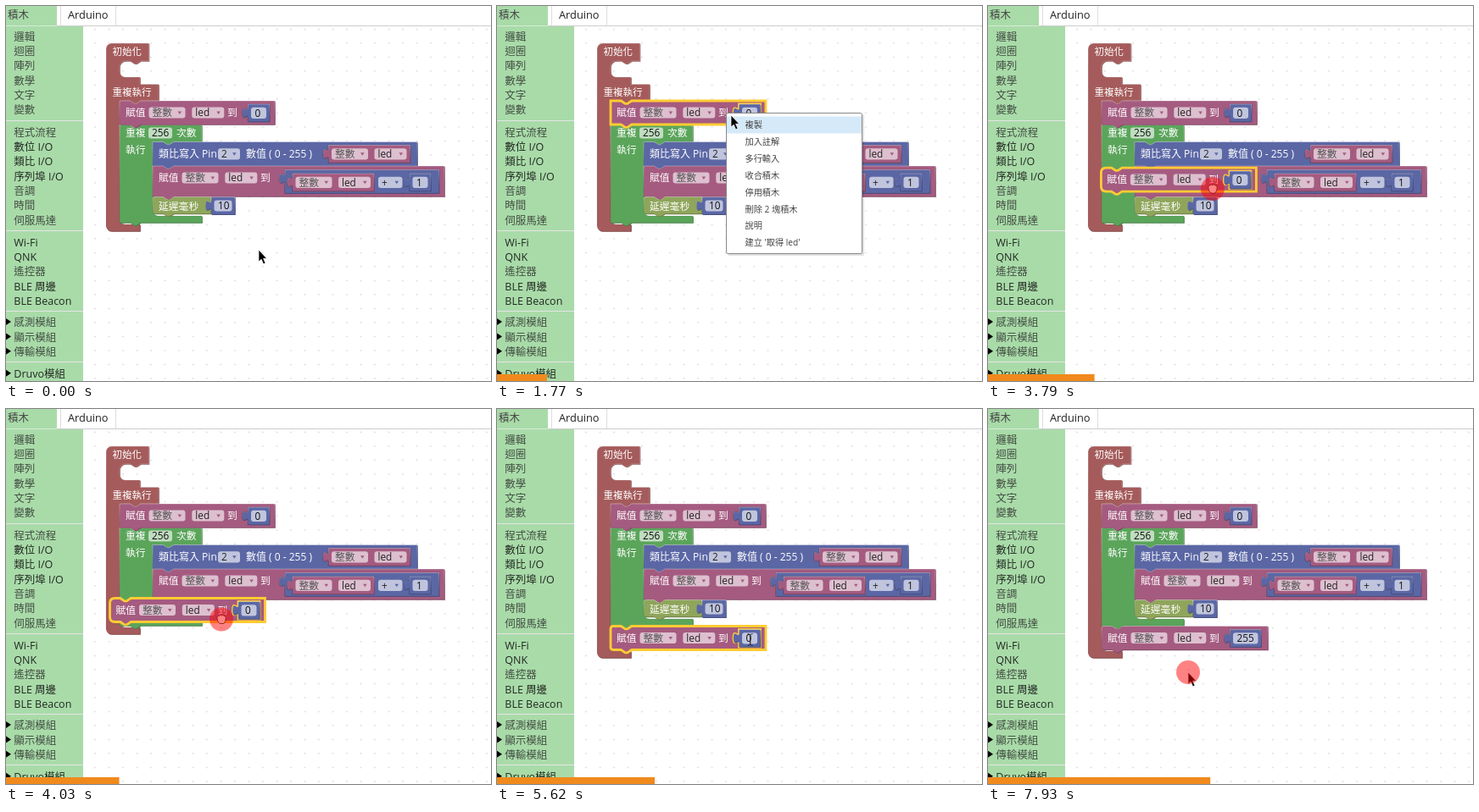
Recreate the animation shown at these times as an HTML page. Size 572 by 443 pixels, loop 8000 ms.

```html
<!DOCTYPE html>
<html lang="zh-Hant">
<head>
<meta charset="utf-8">
<title>Block editor</title>
<style>
html, body { margin: 0; width: 100%; height: 100%; overflow: hidden; background: #fff; }
svg { display: block; }
text { font-family: 'Open Sans', 'Noto Sans CJK TC', 'Noto Sans CJK', 'Noto Sans CJK JP', sans-serif; white-space: pre; }
</style>
</head>
<body>
<svg id="stage" width="572" height="443" viewBox="0 0 572 443"></svg>
<script>
const BROWN = '#a55b5b', PINK = '#a55b80', GREEN = '#5ba55b', BLUE = '#5b67a5', OLIVE = '#8fa55b';
const LOOP = 8000;

// ---- drawing helpers ----
const shade = c => c.replace(/\w\w/g, h => Math.round(parseInt(h, 16) * .8).toString(16).padStart(2, '0'));
const text = (x, y, s, fill = '#fff', size = 11.8) =>
  `<text x="${x}" y="${y}" fill="${fill}" font-size="${size}">${s}</text>`;
const rect = (x, y, w, h, fill, more = '') =>
  `<rect x="${x}" y="${y}" width="${w}" height="${h}" fill="${fill}" ${more}/>`;
const line = (x1, y1, x2, y2, c) => `<path d="M${x1} ${y1}L${x2} ${y2}" stroke="${c}" fill="none"/>`;
const glow = d => `<path d="${d}" fill="none" stroke="#fc3" stroke-width="2.8"/>`;
const block = (col, d) =>
  `<path d="${d}" transform="translate(.8 .8)" fill="${shade(col)}"/>` +
  `<path d="${d}" fill="${col}" stroke="url(#edge)" stroke-width=".8"/>`;

const NOTCH = 'l5 3.3h2.5l5 -3.3', NOTCH_BACK = 'l-5 3.3h-2.5l-5 -3.3';

function stackPath(x, y, w, h, r = 0) {
  return `M${x} ${y + r}q0 ${-r} ${r} ${-r}H${x + 12.3}${NOTCH}H${x + w}v${h}` +
    `H${x + 24.8}${NOTCH_BACK}H${x + r}q${-r} 0 ${-r} ${-r}z`;
}
function mouth(x, top, bottom, right) {
  return `V${top}H${x + 24.8}${NOTCH_BACK}H${x + 6.5}a6.5 6.5 0 0 0 -6.5 6.5V${bottom - 6.5}` +
    `a6.5 6.5 0 0 0 6.5 6.5H${right}`;
}
function valuePath(x, y, w, h = 20.5) {
  return `M${x} ${y}v4c0 8.2 -6.5 -6.5 -6.5 6.1s6.5 -2 6.5 6.1V${y + h}h${w}V${y}z`;
}
function socket(col, x, y, w, h) {
  return `<path d="${valuePath(x, y, w, h)}" fill="none" stroke="${shade(col)}" stroke-width="1.6"/>`;
}
function field(x, cy, w) {
  return rect(x, cy - 6.6, w, 13.2, '#fff', 'rx="3" fill-opacity=".62"');
}
function drop(x, cy, w, s, col, ink = '#222') {
  const a = x + w - 9;
  return field(x, cy, w) + text(x + 4, cy + 4.2, s, ink) +
    `<path d="M${a} ${cy - 1.5}h4.6l-2.3 3.4z" fill="${col}"/>`;
}
const typeDrop = (x, cy) => drop(x, cy, 43, '整數', PINK, '#555');
const nameDrop = (x, cy) => drop(x, cy, 38, 'led', PINK);

function num(x, y, w, s) {
  return block(BLUE, valuePath(x, y, w)) + field(x + 3.5, y + 10.3, w - 7) + text(x + 8, y + 14.6, s, '#111');
}
function getter(x, y) {
  return block(PINK, valuePath(x, y, 96)) + typeDrop(x + 3.5, y + 10.3) + nameDrop(x + 54, y + 10.3);
}
function setHead(x, cy) {
  return text(x + 7, cy + 4, '賦值') + typeDrop(x + 34.5, cy) + nameDrop(x + 85.3, cy) + text(x + 127, cy + 4, '到');
}

// "set led" block at its own origin
function setBlock({ r = 0, sel, val = '0', edit }) {
  const grow = val.length > 2 ? 13 : 0, nw = 25 + (grow ? 11.5 : 0);
  const d = stackPath(0, 0, 183 + grow, 28, r), n = valuePath(151.5, 4, nw);
  let s = block(PINK, d) + (sel ? glow(d) + glow(n) : socket(PINK, 151.5, 4, nw)) +
    setHead(0, 14) + num(151.5, 4, nw, val);
  if (edit) {
    s += glow(n) + rect(153.8, 6.5, nw - 5.2, 16, '#fff', 'stroke="#556" stroke-width=".8"');
    if (edit.all) s += rect(156, 8, 7, 13, '#3390ff');
    s += text(156, 19, edit.text, edit.all ? '#fff' : '#111');
  }
  return s;
}

// ---- fixed parts ----
function toolbox() {
  let s = rect(0, 0, 60, 24, '#a9dba9') + rect(0, 24, 91, 419, '#a9dba9') +
    line(0, 23.5, 60, 23.5, '#d4ecd4') + line(60, 23.5, 572, 23.5, '#ccc') +
    line(64.5, 0, 64.5, 23, '#ddd') + line(129.5, 0, 129.5, 23, '#ddd') +
    text(2, 15, '積木', '#444', 12.5) + text(73, 15, 'Arduino', '#222', 12.8);
  const groups = [
    [36, '邏輯 迴圈 陣列 數學 文字 變數'],
    [149, '程式流程 數位_I/O 類比_I/O 序列埠_I/O 音調 時間 伺服馬達'],
    [279, 'Wi-Fi QNK 遙控器 BLE_周邊 BLE_Beacon'],
    [373.6, '感測模組 顯示模組 傳輸模組', 1],
    [434.3, 'Druvo模組', 1]
  ];
  for (const [y0, names, arrow] of groups) {
    const sep = Math.round(y0 - 13) - .5;
    if (y0 > 40) s += line(0, sep, 91, sep, '#e5e5e5');
    names.split(' ').forEach((name, i) => {
      const y = y0 + i * 17.35, ink = /[A-Z]/.test(name) ? '#222822' : '#434d43';
      s += text(9.3, y + 4.6, name.replace('_', ' '), ink, 12.5);
      if (arrow) s += `<path d="M0 ${y - 4.5}l6 4 -6 4z" fill="#000"/>`;
    });
  }
  return s;
}

function frame(extra) {
  const d = 'M118 50.5a6.5 6.5 0 0 1 6.5 -6.5H168.5' + mouth(134, 65, 84, 158) + 'V92.5H180' +
    mouth(134, 112, 258 + extra, 158) + 'v8H124.5a6.5 6.5 0 0 1 -6.5 -6.5z';
  return block(BROWN, d) + text(125.5, 58, '初始化', '#fff', 11.5) + text(125.5, 105.5, '重複執行', '#fff', 11.5);
}

function repeatStack() {
  const loop = `M134 140.5H146.3${NOTCH}H231` + mouth(173, 160.5, 248, 231) + `v8H158.8${NOTCH_BACK}H134z`;
  return block(GREEN, loop) + text(141, 154, '重複') + field(168, 150, 28) + text(172, 154.3, '256', '#111') +
    text(201, 154, '次數') + text(141, 174, '執行') +
    block(BLUE, stackPath(173, 160.5, 312, 28.5)) + text(180, 179, '類比寫入 Pin', '#fff', 12) +
    drop(250, 174.8, 26, '2', BLUE) + text(283, 179, '數值 ( 0 - 255 )', '#fff', 12) +
    socket(BLUE, 380.5, 164.5, 96) + getter(380.5, 164.5) +
    block(PINK, stackPath(173, 189, 344, 36)) + setHead(173, 203) +
    socket(PINK, 329, 193.5, 181.5, 27.5) + block(BLUE, valuePath(329, 193.5, 181.5, 27.5)) +
    socket(BLUE, 338, 198, 96) + getter(338, 198) + drop(439, 208.3, 28.5, '+', BLUE) +
    socket(BLUE, 476, 198, 25) + num(476, 198, 25, '1') +
    block(OLIVE, stackPath(173, 225.5, 68.5, 20, 3)) + text(180, 240.5, '延遲毫秒') + num(242, 225.7, 28, '10');
}

function menu() {
  const items = ['複製', '加入註解', '多行輸入', '收合積木', '停用積木', '刪除 2 塊積木', '說明', "建立 '取得 led'"];
  return rect(272, 128, 161, 167, '#000', 'opacity=".12" rx="2"') +
    rect(270.5, 126.5, 160, 166, '#fff', 'stroke="#888" rx="2"') + rect(271, 130.5, 159, 20, '#d6e9f8') +
    items.map((s, i) => text(292.5, 144 + i * 19.9, s, '#444', 10.2)).join('');
}

const stage = document.getElementById('stage');
stage.innerHTML = `<defs>
  <linearGradient id="edge" x1="0" y1="0" x2="0" y2="1"><stop offset="0" stop-color="#fff" stop-opacity=".4"/>
  <stop offset="1" stop-color="#000" stop-opacity=".1"/></linearGradient>
  <pattern id="grid" x="96.5" y="19" width="16.5" height="16.5" patternUnits="userSpaceOnUse">
  <path d="M7.5 8.5h2" stroke="#ccc"/></pattern></defs>` +
  rect(91, 24, 481, 419, 'url(#grid)') + toolbox() +
  `<g id="frame"></g>${repeatStack()}<g id="first" transform="translate(134 112)"></g>
  <g id="copy"></g><g id="menu">${menu()}</g>
  <g id="pointer">
    <path id="arrow" d="M0 0V14L3.2 11.2 5.6 16.8 8 15.8 5.6 10.3H9.6Z" fill="#000" stroke="#fff" stroke-width=".7"/>
    <path id="hand" d="M-5 -1q0 -4 2.5 -3q1 -2 2.5 -.5q2 -1.5 3 .4q2.5 -.5 2.3 2.6q0 4 -2.3 6.5h-5q-3 -2.5 -3 -6z" fill="#fff" stroke="#222" stroke-width=".8"/>
    <path id="beam" d="M-3 -7q3 0 3 2v10q0 2 -3 2M3 -7q-3 0 -3 2v10q0 2 3 2" fill="none" stroke="#222" stroke-width=".8"/>
    <circle id="ring" r="14" fill="#f00"/>
  </g>` + rect(0, 435, 0, 8, '#f08a1d', 'id="bar"');

const $ = Object.fromEntries([...stage.querySelectorAll('g[id],path[id],circle[id],rect[id]')].map(e => [e.id, e]));

// ---- motion ----
const path = [[0, 298, 288], [90, 298, 288], [850, 276, 129], [1800, 276, 129], [2300, 275, 149], [2620, 275, 149],
  [3010, 270, 168], [3400, 281, 168], [3480, 281, 168], [4030, 254, 248.5], [4270, 257, 267], [4360, 257, 268],
  [4660, 257, 279], [5160, 262, 279], [5720, 302, 272], [6950, 302, 272], [7500, 298, 211], [7850, 236, 311], [LOOP, 236, 311]];
const clicks = [[950, 1250], [2350, 2650], [3480, 4450], [5910, 6080], [7840, 8100]];

function at(t) {
  let i = 1;
  while (path[i][0] < t) i++;
  const [a, x, y] = path[i - 1], [b, u, v] = path[i];
  const k = (t - a) / (b - a), e = k * k * (3 - 2 * k);
  return [x + (u - x) * e, y + (v - y) * e];
}
const show = (e, on) => e.setAttribute('visibility', on ? 'visible' : 'hidden');
const cache = {};
function fill(name, html) {
  if (cache[name] !== html) $[name].innerHTML = cache[name] = html;
}

function draw(t) {
  const between = (a, b) => t >= a && t < b;
  const [x, y] = at(t), dragging = between(3480, 4360), placed = t >= 4360;

  fill('frame', frame(placed ? 28 : 0));
  fill('first', setBlock({ sel: between(1000, 2450) }));

  const typed = t < 6400 ? '0' : '255'.slice(0, t < 6550 ? 1 : t < 6760 ? 2 : 3);
  const edit = between(5950, 7860) && { text: typed, all: t < 6400 };
  show($.copy, t >= 2450);
  fill('copy', setBlock({ r: placed ? 3 : 6, sel: between(2450, 5950), val: t < 6850 ? '0' : '255', edit }));
  const [cx, cy] = placed ? [134, 256.5] : dragging ? [x - 131.5, y - 25] : [149.5, 143];
  $.copy.setAttribute('transform', `translate(${cx} ${cy})`);

  show($.menu, between(1150, 2450));

  const beam = x > 289 && y > 262 && between(5300, 7200);
  $.pointer.setAttribute('transform', `translate(${x} ${y})`);
  show($.hand, dragging);
  show($.beam, beam);
  show($.arrow, !dragging && !beam);
  const click = clicks.find(([a, b]) => between(a, b));
  $.ring.setAttribute('opacity', click ? .49 * Math.min(1, (click[1] - t) / 100) : 0);

  $.bar.setAttribute('width', t < 70 ? 0 : t * .033 + .5);
}

function tick() {
  draw(performance.now() % LOOP);
  requestAnimationFrame(tick);
}
tick();
</script>
</body>
</html>
```
